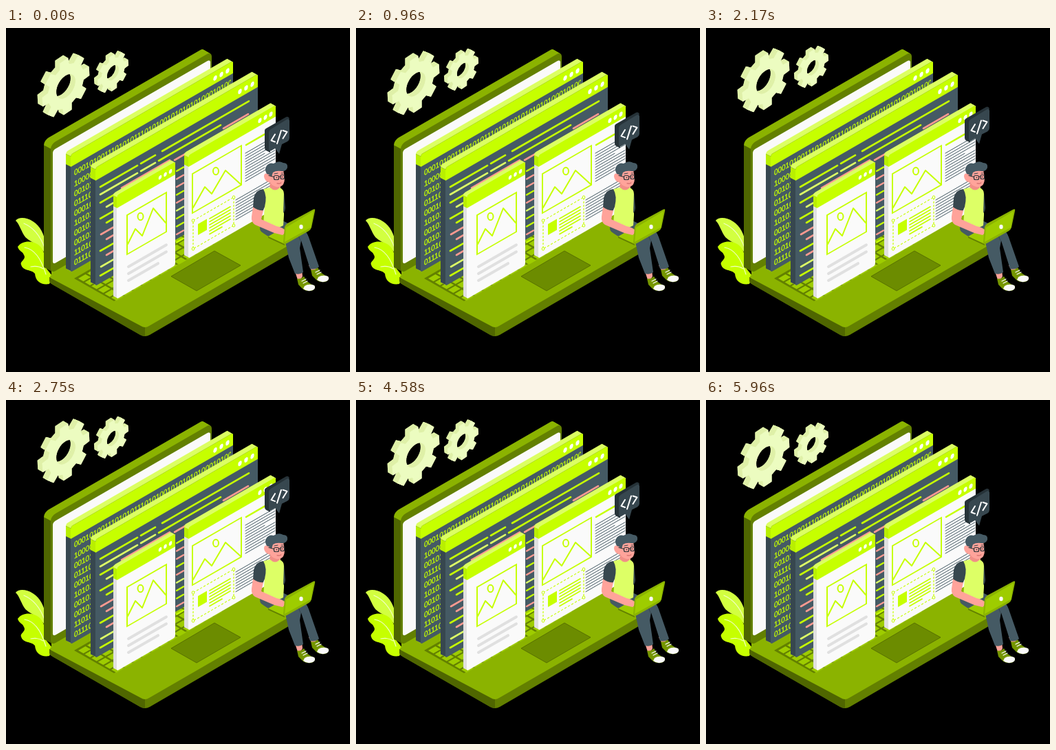
An HTML page that plays this animation: 500x500 px, repeating every 6 s.

```html
<!DOCTYPE html>
<html lang="en">
<head>
<meta charset="utf-8">
<style>
html, body { margin: 0; width: 100%; height: 100%; overflow: hidden; background: #000; }
svg { display: block; width: 100vw; height: 100vh; }
</style>
</head>
<body>
<svg id="stage" viewBox="0 0 500 500" xmlns="http://www.w3.org/2000/svg"></svg>
<script>
const LIME = '#c6ff00', LEAF = '#9ecc00', OLIVE = '#8bb300', MOSS = '#638000', FOREST = '#4f6600',
  SLATE = '#455a64', INK = '#37474f', NIGHT = '#263238', PAPER = '#fafafa', SALMON = '#ff9a91',
  SKIN = '#ffa39a', PALE = '#ddff66';
const SLOPE = Math.tan(Math.PI / 6);

const path = (d, fill, extra = '') => `<path d="${d}" fill="${fill}" ${extra}/>`;
const stroke = (d, color, width = 1, extra = '') =>
  path(d, 'none', `stroke="${color}" stroke-width="${width}" stroke-linecap="round" stroke-linejoin="round" ${extra}`);
const poly = (points, fill, extra = '') => `<polygon points="${points}" fill="${fill}" ${extra}/>`;
const rect = (x, y, w, h, fill, extra = '') =>
  `<rect x="${x}" y="${y}" width="${w}" height="${h}" fill="${fill}" ${extra}/>`;
const ellipse = (x, y, rx, ry, fill, extra = '') =>
  `<ellipse cx="${x}" cy="${y}" rx="${rx}" ry="${ry}" fill="${fill}" ${extra}/>`;
// Wall plane: x keeps its screen length, y rises to the right.
const wall = (x, y, content) => `<g transform="translate(${x} ${y}) skewY(-30)">${content}</g>`;
const rule = (x, y, length, color, width = 2) => stroke(`M${x} ${y}l${length} ${-length * SLOPE}`, color, width);

// Left side of an upright slab between two heights.
function slabSide(x, y, d, from, to, color) {
  const k = d * SLOPE;
  return poly([x + 1, y + from, x - d, y + from - k, x - d, y + to - k, x + 1, y + to], color);
}

// Rounded slab without its front face.
function slab(x, y, w, h, d, radius, side, top) {
  let layers = '';
  for (let i = d; i > 0; i--) layers += wall(x - i, y - i * SLOPE, rect(0, 0, w, h, top, `rx="${radius}"`));
  return layers + slabSide(x, y, d, radius, h - radius / 2, side);
}

function windowFrame({ x, y, w, h, d, bar, body, side, dots }) {
  const [first, gap, rx] = dots;
  return slab(x, y, w, h, d, 3, side, '#dcff63') + slabSide(x, y, d, 3, bar, '#b9ef00') +
    wall(x, y, rect(0, 0, w, h, body, 'rx="3"') +
      path(`M0 ${bar}V3Q0 0 3 0H${w - 3}Q${w} 0 ${w} 3V${bar}Z`, LIME) +
      [0, 1, 2].map(i => ellipse(first + i * gap, bar / 2 + 1, rx, rx * 1.3, '#fff')).join(''));
}

function laptop() {
  let keys = '';
  for (let row = 0; row < 6; row++) {
    for (let col = 0; col < 12; col++) {
      const x = 105 + row * 9.6 + col * 13, y = 364 + row * 5.6 - col * 13 * SLOPE;
      keys += poly([x, y, x + 10.5, y - 6.1, x + 18, y - 1.8, x + 7.5, y + 4.3], LEAF);
    }
  }
  return path('M63 362V368Q64 371 68 373L195 446Q202 450 209 446L414 327V304L202 420Z', MOSS) +
    path('M63 362V368Q64 371 68 373L195 446Q199 448 202 448V430Z', FOREST) +
    path('M66 359L66 350L299 216L416 292V313L208 433Q202 437 196 433L66 364Q62 361 66 359Z', OLIVE) +
    poly('99,364 246,279 303,312 157,397', MOSS) + keys +
    poly('240,361 303,324 341,345 277,382', '#6c8c00', 'stroke="#587100" stroke-width="1"') +
    slab(65, 169, 234, 188, 10, 7, FOREST, OLIVE) +
    wall(65, 169, rect(0, 0, 234, 188, MOSS, 'rx="7"') + rect(3, 10.5, 229, 166, PAPER, 'rx="4"'));
}

function binaryWindow() {
  const rows = ['000101001110101011101010010101010100010100110101011', '1000010', '0010101', '0111010',
    '0001010', '1010101', '0010100', '0010101', '1101001', '0111010'];
  const text = rows.map((row, i) =>
    `<text transform="translate(5 ${33.5 + i * 14.3 + (i ? 2 : 0)}) scale(.866 1)">${row}</text>`).join('');
  return windowFrame({ x: 94, y: 184, w: 236, h: 171, d: 7, bar: 18, body: SLATE, side: INK, dots: [210, 9, 2.7] }) +
    wall(94, 184, `<clipPath id="inside"><rect width="233" height="171"/></clipPath>
      <g clip-path="url(#inside)" fill="${LIME}" stroke="${LIME}" stroke-width=".35"
        font-family="'Liberation Sans', Arial, sans-serif" font-size="11.5">${text}</g>`);
}

function codeWindow() {
  const lines = [
    [137, 231, 54, LIME], [196, 197, 21, LIME], [227, 179, 126, LIME],
    [137, 242, 54, PALE], [196, 208, 21, PALE], [222, 193, 90, LIME], [316, 146, 36, SALMON],
    [137, 254, 23, LIME], [168, 232.5, 70, SALMON], [245, 192, 18, SALMON],
    [146, 260, 10, PALE], [137, 277, 19, LIME], [146, 283, 10, LIME], [138, 300, 18, SALMON],
    [146, 307, 10, SALMON], [137, 324, 19, LIME], [146, 330, 10, SALMON], [138, 347, 18, PALE],
    [137, 360, 19, LIME]];
  const gapColors = [LIME, SALMON, SALMON, LIME, SALMON, PALE, LIME, LIME, SALMON, LIME];
  return windowFrame({ x: 130, y: 203, w: 236, h: 172, d: 7, bar: 19, body: SLATE, side: INK, dots: [210, 9, 2.7] }) +
    lines.map(([x, y, length, color]) => rule(x, y, length, color, 2.6)).join('') +
    gapColors.map((color, i) => rule(248, 208 + i * 11.5, 10, color, 2.4)).join('');
}

function picture(x, y, w, h, sun, hills) {
  return wall(x, y, rect(0, 0, w, h, 'none', `stroke="${LIME}" stroke-width="2"`)) +
    ellipse(...sun, 4, 5.2, 'none', `stroke="${LIME}" stroke-width="2"`) + stroke(hills, LIME, 2);
}

function smallPage() {
  return windowFrame({ x: 161, y: 243, w: 85, h: 151, d: 5, bar: 19, body: PAPER, side: '#e0e0e0', dots: [63, 7.5, 2.3] }) +
    picture(176, 272, 57, 57, [195.5, 274], 'M177 314L188 292L198 302L214 262L232 283') +
    [[347, 58], [357, 58], [367, 46]].map(([y, length]) => rule(178, y, length - 3, '#e0e0e0', 4)).join('');
}

function largePage() {
  let text = '';
  for (let i = 0; i < 11; i++) text += rule(348, 182 + i * 4.1, i % 5 === 4 ? 28 : 43, SLATE, 1);
  for (let i = 0; i < 8; i++) text += rule(334, 250 + i * 4.1, i === 7 ? 36 : 56, SLATE, 1);
  for (let i = 0; i < 6; i++) text += rule(296, 277 + i * 4.5, i === 5 ? 18 : 30, LIME, 1.8);
  const corners = [[272, 280], [331, 246], [331, 287], [272, 321]]
    .map(([x, y]) => ellipse(x, y, 1.8, 2.2, PAPER, `stroke="${LIME}"`)).join('');
  return windowFrame({ x: 265, y: 185, w: 127, h: 150, d: 6, bar: 17, body: PAPER, side: '#e0e0e0', dots: [104, 8, 2.6] }) +
    picture(271, 212, 71, 57, [305, 208], 'M272 261L289 231L299 241L319 207L341 227') +
    rule(349, 170, 27, LIME, 2.5) + text +
    wall(272, 280, rect(0, 0, 59, 41, 'none', `stroke="${LIME}" stroke-width="1.2" stroke-dasharray="3 2"`)) + corners +
    wall(279, 285, rect(0, 0, 13, 16, LIME));
}

function gear(x, y, radius, hole, depth) {
  const teeth = 8, step = Math.PI * 2 / teeth, root = radius * 0.76, turn = -0.1;
  let outline = '';
  for (let i = 0; i < teeth; i++) {
    for (const [part, r] of [[-.31, root], [-.21, radius], [.21, radius], [.31, root]]) {
      const a = (i + part + turn) * step - Math.PI / 2;
      outline += `${outline ? 'L' : 'M'}${(r * Math.cos(a)).toFixed(2)} ${(r * Math.sin(a)).toFixed(2)}`;
    }
  }
  outline += `ZM${-hole} 0a${hole} ${hole} 0 1 0 ${2 * hole} 0a${hole} ${hole} 0 1 0 ${-2 * hole} 0Z`;
  let layers = '';
  for (let d = depth; d >= 0; d -= 0.5) {
    const color = d ? '#dff0a8' : '#ecfcc0';
    layers += path(outline, color, `fill-rule="evenodd" stroke="${color}" stroke-width="1" stroke-linejoin="round"
      transform="matrix(.866 -.5 0 1 ${x - d} ${y - d * SLOPE})"`);
  }
  return layers;
}

const bubble = () =>
  path('M376 149Q376 147 378 146L406 130Q409 128 411 130L412 132L384 151V181L378 178Q376 177 376 174Z', NIGHT) +
  path('M382 152Q382 149 385 147L408 133Q412 131 412 135V160Q412 163 409 165L401 169L397 183L391 175L386 178Q382 180 382 176Z', INK) +
  stroke('M391 154.5L385.5 163.5L391 165.5M394 168L400 149M402.5 149L408.5 151L402.5 160.5', '#fff', 2);

function plant() {
  return path('M14 280C18 274 30 275 39 281C50 288 55 299 58 314L57 328C47 312 32 311 26 301C21 292 18 283 14 280Z', '#d2ff40') +
    path('M17 318C24 308 39 309 47 315C55 321 58 333 59 350L67 360L63 372C52 374 43 369 42 357C36 350 25 354 22 344C20 339 30 336 26 330C24 324 19 325 17 318Z', LIME) +
    stroke('M26 284C40 290 50 303 56 319M27 319C41 321 51 335 58 358M36 347Q47 345 54 350', '#f0ffc2', 1.2);
}

function shoe(x, y) {
  return `<g transform="translate(${x} ${y})">` +
    path('M0 3Q5 5 10 0L14 7Q21 12 26 14Q27 19 21 21Q13 22 8 18L2 12Z', '#759600') +
    path('M11 14Q17 10 25 13Q28 17 23 20Q15 23 9 18Z', PAPER) +
    stroke('M7 7L13 4M9 10L15 7', PAPER, 1.2) + '</g>';
}

function man() {
  return path('M420 354L424 366Q429 366 431 361L430 351Z', SKIN) + path('M440 345L445 354Q450 353 452 348L449 341Z', SKIN) +
    shoe(423, 361) + shoe(443, 348) +
    path('M371 282Q367 292 371 296C382 305 394 308 406 311L411 334L420 357Q427 359 432 355L427 320L429 309L442 350Q449 352 455 347L440 304Q435 289 418 288L400 279Z', SLATE) +
    stroke('M428 309L424 299L401 293', INK, 1) +
    path('M384 221L383 237Q391 243 399 235V222Z', '#f18f87') +
    path('M373 235Q379 232 384 232Q391 239 398 232Q404 235 404 241L404 272L403 287Q388 296 374 285L376 258Z', PALE) +
    path('M360 247Q363 235 374 234Q380 244 376 260L373 267Q364 266 359 261Z', INK) +
    path('M404 240L406 261Q406 266 403 269Z', INK) +
    path('M380 207L403 206L405 218Q405 229 398 231Q389 232 384 225Q376 223 375 216Q375 210 380 212Z', SKIN) +
    path('M379 212Q375 205 379 200Q383 195 389 197Q396 192 403 196Q410 196 409 203Q407 209 400 208Q392 207 388 210L386 216L382 213Z', SLATE) +
    rect(389.5, 214.5, 7, 6, 'none', `rx="2" stroke="${NIGHT}" stroke-width="1.2"`) +
    rect(399, 213.5, 5.5, 6, 'none', `rx="2" stroke="${NIGHT}" stroke-width="1.2"`) +
    stroke('M382 214.5L389.5 216.5M396.5 216H399', NIGHT, 1.2) +
    stroke('M390 212L395 211M400 211H403', INK, 1) +
    ellipse(393.5, 217.5, .7, .9, NIGHT) + ellipse(401.5, 216.5, .7, .9, NIGHT) +
    stroke('M394 226Q398 227 400 225', '#b84d50', .8) +
    poly('381,303 402,291 424,302 405,314', LEAF) + poly('381,303 405,314 405,316 381,305', MOSS) +
    path('M359 260Q366 266 374 265L371 278L393 288Q402 289 407 296L402 301L390 298L362 286Q356 282 357 274Z', SKIN) +
    path('M405 289Q406 286 409 284L446 264Q450 262 449 266L444 290Q443 293 440 295L408 313Q403 315 403 311Z', OLIVE) +
    path('M407 290L447 266L443 290L405 311Z', LEAF) +
    ellipse(429, 289, 2.7, 3.2, PAPER);
}

const stage = document.getElementById('stage');
stage.innerHTML = rect(0, 0, 500, 500, '#000') + plant() + laptop() + binaryWindow() + codeWindow() +
  largePage() + smallPage() +
  `<g id="gears">${gear(87, 85, 39.5, 16.5, 7)}${gear(155.5, 65, 25.7, 10.5, 5)}</g><g id="bubble">${bubble()}</g>` + man();

const gears = document.getElementById('gears'), note = document.getElementById('bubble');
const LOOP = 6000;

function draw(time) {
  const phase = (time % LOOP) / LOOP;
  const lift = 1 - Math.abs(1 - 2 * phase);
  gears.setAttribute('transform', `translate(0 ${-10 * lift})`);
  note.setAttribute('transform', `translate(0 ${-20 * lift})`);
}

const start = performance.now();
function tick() {
  draw(performance.now() - start);
  requestAnimationFrame(tick);
}
draw(0);
requestAnimationFrame(tick);
</script>
</body>
</html>
```
